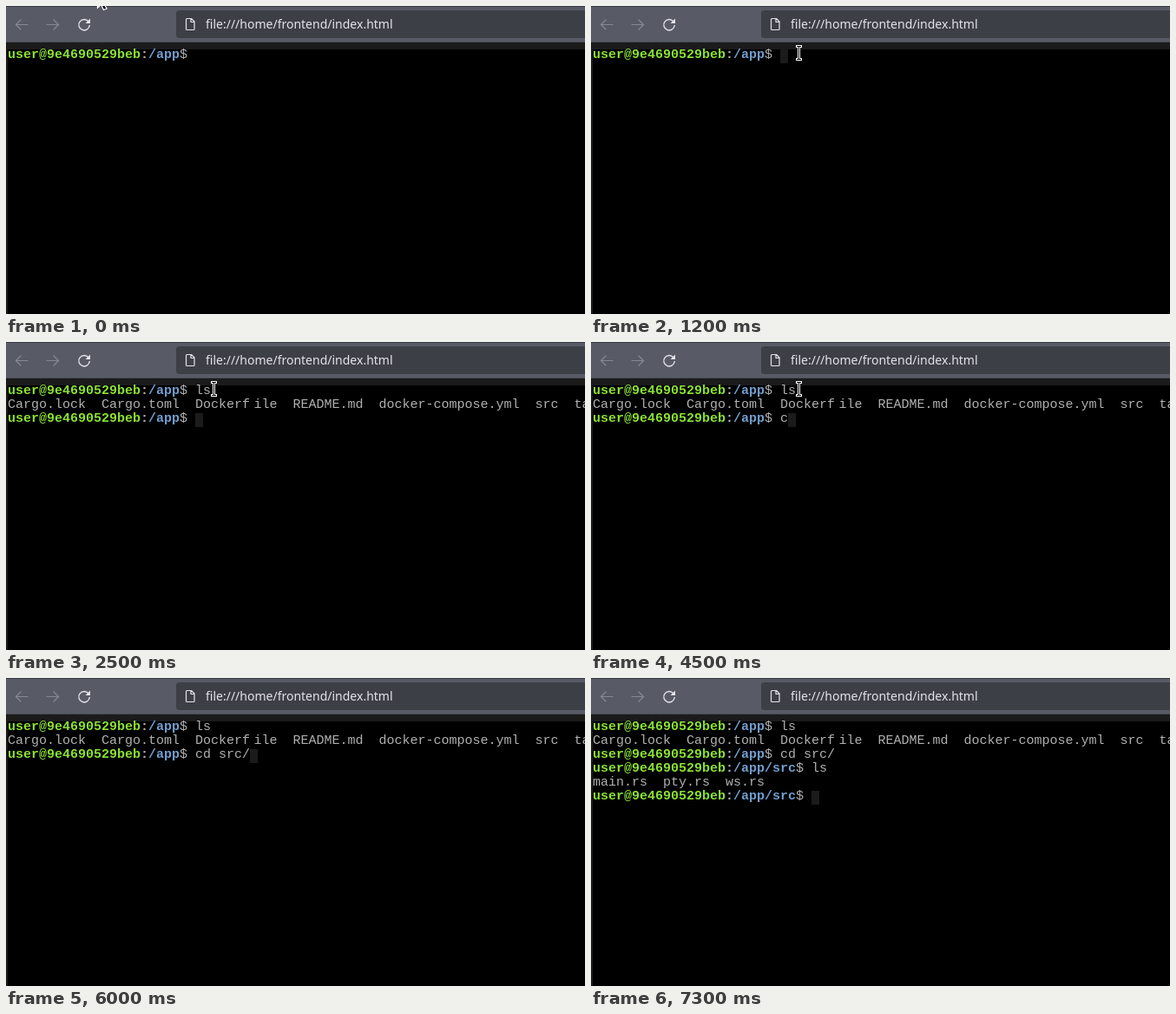
Recreate the animation shown at these times as an HTML page with a canvas. Size 667x355 px, loop 8000 ms.

```html
<!DOCTYPE html>
<html lang="en">
<head>
<meta charset="utf-8">
<title>Terminal in a browser</title>
<style>
  html, body { margin: 0; width: 100%; height: 100%; overflow: hidden; background: #000; }
  canvas { display: block; }
</style>
</head>
<body>
<canvas id="stage" width="667" height="355"></canvas>
<script>
const ctx = document.getElementById('stage').getContext('2d');
const LOOP = 8000, CELL = 9, ROW = 16, LEFT = 2, TOP = 50, BASELINE = 10;
const MONO = '15px "Liberation Mono", monospace';
const PLAIN = '#b0b0b0', GREEN = '#8ae234', BLUE = '#729fcf', BLOCK = '#1b1b1c';
const ICON = '#e4e4e9', DIM_ICON = '#868892';

// Each command: when its prompt appears, where, what is typed, and what it prints.
// Printed pieces are [x, text].
const commands = [
  { at: 0, dir: '/app',
    typed: [[2300, 'l'], [2400, 'ls']],
    output: [[LEFT, 'Cargo.lock  Cargo.toml  Dockerf'],
             [285.5, 'ile  README.md  docker-compose.yml  src  target']] },
  { at: 2500, dir: '/app',
    typed: [[4500, 'c'], [4600, 'cd'], [4700, 'cd '], [4800, 'cd s'], [5000, 'cd ser'],
            [5400, 'cd se'], [5600, 'cd s'], [5700, 'cd sr'], [6000, 'cd src/']] },
  { at: 6700, dir: '/app/src',
    typed: [[7100, 'l'], [7200, 'ls']],
    output: [[LEFT, 'main.rs  pty.rs  ws.rs']] },
  { at: 7300, dir: '/app/src', typed: [] },
];
const FOCUS_TIME = 1200;

// [time, shape, x, y]
const pointer = [
  [0, 'arrow', 105, -14], [500, 'arrow', 150, 18], [600, 'beam', 215, 50],
  [700, 'beam', 246, 64], [800, 'beam', 240, 54], [4600, 'none', 0, 0],
];

const latest = (steps, t) => steps.filter(step => step[0] <= t).pop();

function rect(color, x, y, w, h) {
  ctx.fillStyle = color;
  ctx.fillRect(x, y, w, h);
}

function stroke(path, color, width) {
  ctx.strokeStyle = color;
  ctx.lineWidth = width;
  ctx.stroke(new Path2D(path));
}

function write(text, x, baseline, color = PLAIN, font = MONO) {
  ctx.font = font;
  ctx.fillStyle = color;
  ctx.fillText(text, x, baseline);
}

function drawToolbar() {
  rect('#585a66', 0, 0, 667, 41);
  rect('#33353f', 0, 0, 667, 1);
  rect('#4a4b55', 0, 41, 667, 1);
  rect(BLOCK, 0, 42, 667, 8);
  rect(BLOCK, 0, 50, 2, 305);

  ctx.fillStyle = '#3d3f47';
  ctx.beginPath();
  ctx.roundRect(196, 5, 500, 32, 4);
  ctx.fill();

  ctx.lineCap = ctx.lineJoin = 'round';
  stroke('M25 21.5H11.5M17 16L11.5 21.5L17 27', DIM_ICON, 1.2);
  stroke('M47 21.5H60.5M55 16L60.5 21.5L55 27', DIM_ICON, 1.2);
  stroke('M95 18A6.2 6.2 0 1 0 96.2 22.5', ICON, 1.4);
  ctx.fillStyle = ICON;
  ctx.fill(new Path2D('M97 14.5V20H91.5Z'));
  stroke('M208.5 14.5H213.5L217 18V26.5Q217 27.5 216 27.5H208.5Q207.5 27.5 207.5 26.5V15.5Q207.5 14.5 208.5 14.5ZM213 15V18.5H216.5',
    ICON, 1.2);
  write('file:///home/frontend/index.html', 230, 26, ICON, '14px "Noto Sans", sans-serif');
}

function drawPrompt(dir, y) {
  let x = LEFT;
  const parts = [['user@9e4690529beb', GREEN, 'bold '], [':', PLAIN, 'bold '],
                 [dir, BLUE, 'bold '], ['$ ', PLAIN, '']];
  for (const [text, color, weight] of parts) {
    write(text, x, y, color, weight + MONO);
    x += text.length * CELL;
  }
  return x;
}

function drawTerminal(t) {
  let y = TOP;
  commands.forEach((command, i) => {
    if (t < command.at) return;
    const x = drawPrompt(command.dir, y + BASELINE);
    const [, text] = latest(command.typed, t) || [0, ''];
    const next = commands[i + 1];
    const finished = next && t >= next.at;
    if (!finished && t >= FOCUS_TIME) rect(BLOCK, x + text.length * CELL, y, CELL, ROW);
    write(text, x, y + BASELINE);
    y += ROW;
    if (finished && command.output) {
      for (const [px, piece] of command.output) write(piece, px, y + BASELINE);
      y += ROW;
    }
  });
}

function drawPointer(t) {
  const [, shape, x, y] = latest(pointer, t);
  ctx.save();
  ctx.translate(x, y);
  ctx.lineJoin = 'miter';
  ctx.lineCap = 'square';
  if (shape === 'arrow') {
    const arrow = 'M.5 0V16L4.5 12.5L7.5 18.5L11 17L8 11.5H12.5Z';
    ctx.fillStyle = '#000';
    ctx.fill(new Path2D(arrow));
    stroke(arrow, '#fff', 1.3);
  } else if (shape === 'beam') {
    const beam = 'M-2.5 -7.5H1.5M-.5 -7.5V7.5M-2.5 7.5H1.5';
    stroke(beam, '#fff', 3);
    stroke(beam, '#000', 1);
  }
  ctx.restore();
}

function frame(now) {
  const t = now % LOOP;
  rect('#000', 0, 0, 667, 355);
  drawToolbar();
  drawTerminal(t);
  drawPointer(t);
  requestAnimationFrame(frame);
}
requestAnimationFrame(frame);
</script>
</body>
</html>
```
